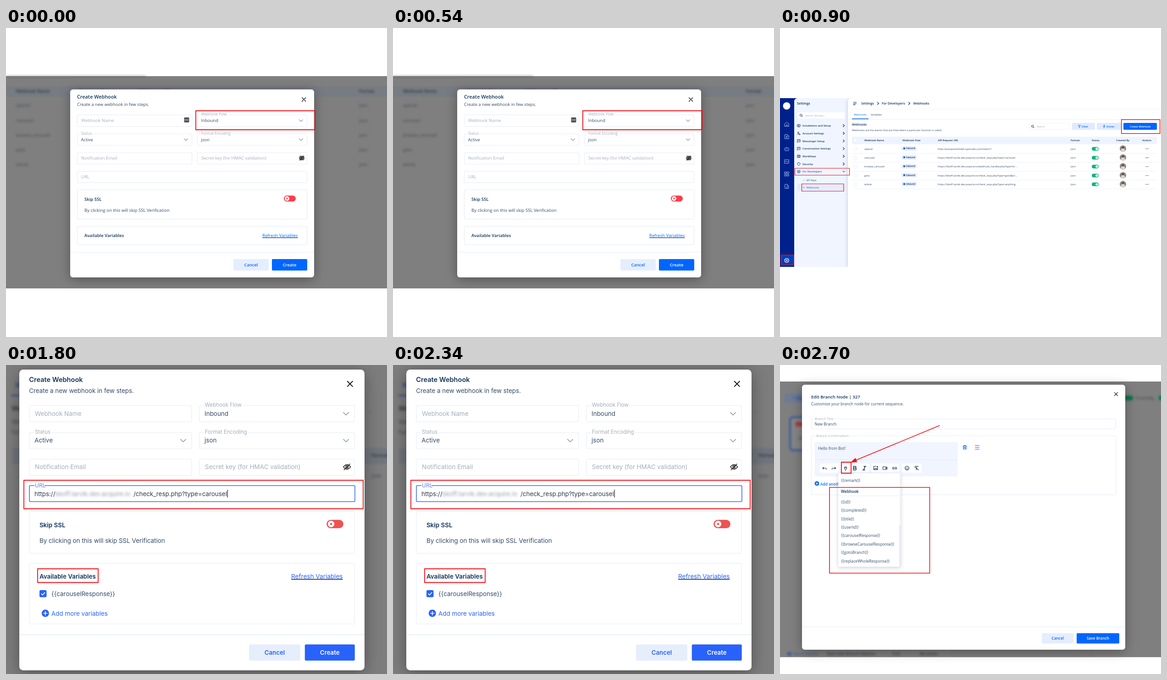
An HTML page that plays this animation: 831x674 px, repeating every 3.6 s.

```html
<!DOCTYPE html>
<html lang="en">
<head>
<meta charset="utf-8">
<style>
html, body { margin: 0; width: 100%; height: 100%; overflow: hidden; background: #fff; }
svg { display: block; }
rect { vector-effect: non-scaling-stroke; }
.sans { font-family: "Open Sans", "Noto Sans", sans-serif; }
.inter { font-family: Inter, sans-serif; }
.bold { font-weight: 600; }
.mid { text-anchor: middle; }
.notch { stroke: #fff; stroke-width: 4px; paint-order: stroke; }
.blur { filter: blur(2.5px); }
.modal { filter: drop-shadow(0 4px 12px rgba(0, 0, 0, .35)); }
.menu { filter: drop-shadow(0 2px 4px rgba(20, 40, 90, .22)); }
</style>
</head>
<body>
<svg id="stage" width="831" height="674" viewBox="0 0 831 674"></svg>
<script>
const NAVY = '#12345a', INK = '#334b68', HINT = '#a3aebd', EDGE = '#e3ebfa', RED = '#f80c12', BLUE = '#0066ff';

const rect = (x, y, w, h, fill, r = 0, stroke = 'none', sw = 1, cls = '') =>
  `<rect x="${x}" y="${y}" width="${w}" height="${h}" rx="${r}" fill="${fill}" stroke="${stroke}" stroke-width="${sw}" class="${cls}"/>`;
const circle = (x, y, r, fill, stroke = 'none', sw = 1) =>
  `<circle cx="${x}" cy="${y}" r="${r}" fill="${fill}" stroke="${stroke}" stroke-width="${sw}"/>`;
// y is the middle of the capitals
const text = (x, y, s, size, fill = INK, cls = '') =>
  `<text x="${x}" y="${y + size * .36}" font-size="${size}" fill="${fill}" class="${cls}">${s}</text>`;
const path = (d, stroke = INK, sw = 1, fill = 'none') =>
  `<path d="${d}" stroke="${stroke}" stroke-width="${sw}" fill="${fill}" stroke-linecap="round" stroke-linejoin="round"/>`;
const icon = (x, y, d, stroke, sw = 1, scale = 1) =>
  `<g transform="translate(${x} ${y}) scale(${scale})">${path(d, stroke, sw)}</g>`;
const frame = (x, y, w, h, sw = 1.5) => rect(x, y, w, h, 'none', 0, RED, sw);
const group = (cls, ...parts) => `<g class="${cls}">${parts.join('')}</g>`;
const button = (x, y, w, h, label, size, fill, color) =>
  rect(x, y, w, h, fill, 2) + text(x + w / 2, y + h / 2, label, size, color, 'bold mid');

const CROSS = 'M-4 -4L4 4M4 -4L-4 4', DOWN = 'M-4 -2L0 2L4 -2', RIGHT = 'M-1.5 -2.5L1.5 0L-1.5 2.5';
const EYE = 'M-5.5 0Q0 -7 5.5 0Q0 7 -5.5 0M-4.5 4.5L4.5 -4.5M-1.8 0A1.8 1.8 0 1 0 1.8 0A1.8 1.8 0 1 0 -1.8 0';
const LENS = 'M-3 -.5A2.3 2.3 0 1 0 1.6 -.5A2.3 2.3 0 1 0 -3 -.5M1.2 1.2L3 3';

// Webhook dialog; "extra" is the added height of the variables box
function webhookForm({ blue, red, soft, extra, toggleX, cancelX, titleSize, url }) {
  const field = (x, y, w, h = 25) => rect(x + .5, y + .5, w, h, '#fff', 1, EDGE);
  const hint = (x, y, s) => text(x, y, s, 9.55, HINT);
  const select = (x, y, w, label, value) =>
    field(x, y, w) + text(x + 9, y - .5, label, 8.1, HINT, 'notch') +
    text(x + 8.5, y + 12.6, value, 9.5) + icon(x + w - 12.5, y + 13, DOWN, '#8d9aab', 1.1);
  const t = (x, y, s, cls = '') => text(x, y, s, 9.5, cls ? NAVY : INK, cls);
  return rect(140, 134, 532, 410 + extra, '#fff', 6, 'none', 0, 'modal') +
    text(155, 149.6, 'Create Webhook', titleSize, NAVY, 'bold') +
    text(155, 166.3, 'Create a new webhook in few steps.', 9.45) +
    icon(649.6, 156, CROSS, '#111', 1.3) +
    field(155, 189, 250) + hint(164, 201.7, 'Webhook Name') +
    select(417, 189, 239, 'Webhook Flow', 'Inbound') +
    select(155, 230.5, 250, 'Status', 'Active') +
    select(417, 230.5, 239, 'Format Encoding', 'json') +
    field(155, 271.5, 250) + hint(164, 284, 'Notification Email') +
    field(417, 271.5, 239) + hint(426, 284, 'Secret key (for HMAC validation)') +
    icon(645, 284, EYE, '#222', 1.1) +
    (url ? '' : field(155, 312, 501) + hint(164, 324.5, 'URL')) +
    field(155, 352.5, 501, 64) + t(171, 373.4, 'Skip SSL', 'bold') +
    t(171, 397.3, 'By clicking on this will skip SSL Verification') +
    rect(toggleX, 365.6, 26, 12.8, red, 6.4) + circle(toggleX + 7, 372, 5, '#fff') + circle(toggleX + 7, 372, 1.7, red) +
    field(155, 432, 501, 40 + extra) + t(171, 452.6, 'Available Variables', 'bold') +
    `<g text-decoration="underline">${text(559, 452.6, 'Refresh Variables', 9.6, blue)}</g>` +
    rect(140, 488.5 + extra, 532, 1, EDGE) +
    button(cancelX, 504 + extra, 573 - cancelX, 25, 'Cancel', 9.4, soft, blue) +
    button(580, 504 + extra, 77, 25, 'Create', 9.4, blue, '#fff');
}

function inboundScene() {
  const names = ['special', 'carousel', 'browse_carousel', 'goto', 'whole'];
  const dark = '#3f444d';
  return group('sans',
    rect(0, 105, 831, 463, '#7f7f7f'),
    rect(0, 127, 831, 23, '#777b82'),
    group('blur',
      rect(0, 105, 305, 2, '#626468'),
      ...[[22, 'Webhook Name'], [160, 'Webhook Flow'], [287, 'API Request URL'], [770, 'Format']]
        .map(([x, s]) => text(x, 138, s, 9.5, '#283142', 'bold')),
      ...names.map((s, i) => text(22, 169 + i * 32.2, s, 9.5, dark) + text(770, 169 + i * 32.2, 'json', 9.5, dark))),
    webhookForm({ blue: BLUE, red: '#ff3b49', soft: '#e5eeff', extra: 0, toggleX: 606, cancelX: 496, titleSize: 10.85 }),
    rect(388.5, 195, 11, 11, '#555', 1.5), ...[391, 394, 397].map(x => circle(x, 200.5, .9, '#fff')),
    rect(640, 278.5, 10.5, 10, 'rgba(40,40,40,.6)', 1.5),
    frame(414, 180.5, 260, 41.5, 1.8));
}

function listScene() {
  const base = 'https://bkoff.tarvik.dev.acquire.io/';
  const rows = [
    ['special', 'http://jsonplaceholder.typicode.com/todos/1'],
    ['carousel', base + 'check_resp.php?type=carousel'],
    ['browse_carousel', base + 'webhook_handle.php?type=br...'],
    ['goto', base + 'check_resp.php?type=goto&amp;br...'],
    ['whole', base + 'check_resp.php?type=anything']];
  const menu = ['Installation and Setup', 'Account Settings', 'Messenger Setup', 'Conversation Settings', 'Workflows', 'Security', 'For Developers'];
  const menuIcons = ['M-3 -2.5H3V2H-3ZM-1 3H1M-.5 -1L1 0L-.5 1Z', 'M-1 -3A1.5 1.5 0 1 0 -1 0A1.5 1.5 0 1 0 -1 -3M-3.5 3Q-1 -1 1 2M1 1.5H3V3H1Z',
    'M-3 -3H3V2H-1L-3 3ZM-1.5 -1H1.5', 'M-3 -3H3V2H-1L-3 3ZM-1.5 -1H1.5', 'M-3 -2.5H3V2.5H-3ZM-1 -2.5V2.5M1 -2.5V2.5',
    'M0 -3L2.7 -2V1Q2 2.5 0 3.3Q-2 2.5 -2.7 1V-2Z', 'M-3 -2.5H3V2H-3ZM-1 3H1M-1.5 -1H1.5M-1.5 .5H1.5'];
  const barIcons = ['M-4.5 -1L0 -4.5L4.5 -1V4.5H-4.5ZM-1.5 4.5V1.5H1.5V4.5', 'M-4 -4.5H2V-2H4.5V4.5H-4ZM-1.5 3Q0 0 2 3M-1 -1H1V.5H-1Z',
    'M-3.5 -2.5H3.5L5 0L3.5 3.5H-3.5L-5 0ZM-1.5 0V1M1.5 0V1M0 -4.5V-2.5', 'M-4.5 -4H4.5V4H-4.5ZM-4 1L-1.5 -1.5L1 1.5L4 -1',
    'M-4.5 -4.5H-1V-1H-4.5ZM1 -4.5H4.5V-1H1ZM-4.5 1H-1V4.5H-4.5ZM1 1H4.5V4.5H1Z', 'M-3.5 -4.5H1.5V-2H4V4.5H-3.5ZM-1 2.5H2M0 0H2'];
  const cell = (x, y, s) => text(x, y, s, 5.65);
  const soft = '#dfeaff';
  const row = ([name, url], i) => {
    const y = 263.5 + i * 19.4;
    return rect(161, y - 3, 6.5, 6.5, '#fff', 1, '#dfe7f5', .7) + cell(184, y, name) +
      rect(265, y - 5.5, 33, 9.5, '#e1ebff', 3.5) + circle(271, y - .8, 2.1, '#0052d6') +
      text(275, y - .8, 'Inbound', 4.85, NAVY, 'bold') + cell(344, y, url) + cell(634, y, 'json') +
      rect(680, y - 4, 15, 8, '#0bb67d', 4) + circle(691, y, 2.7, '#fff') + circle(691, y, .8, '#0bb67d') +
      circle(748, y - .5, 7, '#8e8882') + path(`M743.5 ${y + 4.5}Q744 ${y - 1} 748 ${y - 1}Q752 ${y - 1} 752.5 ${y + 4.5}Q748 ${y + 8} 743.5 ${y + 4.5}`, 'none', 0, '#d9d6d2') +
      circle(748, y - 2.7, 2.2, '#4e4743') +
      [797.8, 800.5, 803.2].map(x => circle(x, y, .8, INK)).join('') + rect(157, y + 9.5, 665, .8, '#e9eef7');
  };
  const item = (s, i) => {
    const y = 213 + i * 16.7, last = i === 6, color = last ? BLUE : NAVY;
    return icon(41, y, menuIcons[i], color, .9) + text(49, y, s, 5.85, color, 'bold') +
      icon(139, y, last ? 'M-2 -1L0 1L2 -1' : RIGHT, color, 1.2);
  };
  return group('sans',
    rect(0, 153, 60, 368, '#00218c'),
    path('M31 521V161Q31 153 39 153H160V521Z', 'none', 0, '#f0f5ff'),
    group('menu', path('M148 521V161Q148 153 156 153H831V521Z', 'none', 0, '#fff')),
    rect(0, 521, 831, 30, '#fff'), rect(0, 130, 831, 23, '#fff'),
    circle(14.5, 170, 8, '#fff'),
    ...barIcons.map((d, i) => icon(14.7, 210 + i * 27.1, d, '#9fb2ee', 1)),
    rect(3, 496, 27, 21, '#0a3bb0', 3),
    icon(14.7, 507, 'M-1.2 -4.5H1.2L1.8 -3L3.6 -3.2L4.7 -1.2L3.7 0L4.7 1.2L3.6 3.2L1.8 3L1.2 4.5H-1.2L-1.8 3L-3.6 3.2L-4.7 1.2L-3.7 0L-4.7 -1.2L-3.6 -3.2L-1.8 -3ZM-1.5 0A1.5 1.5 0 1 0 1.5 0A1.5 1.5 0 1 0 -1.5 0', '#fff', 1.1),
    frame(2.5, 495.5, 27.5, 21.5),
    text(37, 164.2, 'Settings', 7.4, NAVY, 'bold'),
    rect(38, 184, 103, 13.5, '#fff', 2), icon(46.5, 190.6, LENS, NAVY, 1), text(55, 190.6, 'Search Settings...', 5.65, HINT),
    ...menu.map(item),
    rect(38, 340, 101, 15.5, '#e4edff'),
    circle(52, 332, .7, INK), cell(57.5, 332, 'API Keys'),
    circle(52, 348, .9, BLUE), text(57.5, 347.8, 'Webhooks', 5.65, BLUE),
    frame(32.5, 306, 119, 15, 1.2), frame(47.5, 340, 91.5, 16, 1.2),
    path('M160 162H166.5M160 164.7H166.5M160 167.4H164', NAVY, 1.1),
    text(177, 164.3, 'Settings', 7.2, NAVY, 'bold'), icon(214, 164.5, RIGHT, NAVY, 1.2),
    text(222, 164.3, 'For Developers', 7, NAVY, 'bold'), icon(282, 164.5, RIGHT, NAVY, 1.2),
    text(290.5, 164.3, 'Webhooks', 7, NAVY, 'bold'),
    rect(148, 176.5, 683, .8, '#edf1f8'), rect(148, 198.8, 683, .8, '#e6ecf6'),
    text(161, 188.7, 'Webhooks', 5.65, BLUE), cell(198, 188.7, 'Variables'), rect(157, 197.4, 36, 1.6, BLUE),
    text(157, 210.8, 'Webhooks', 6.4, NAVY, 'bold'),
    cell(157, 223.2, 'Webhooks are the events that are fired when a particular function is called.'),
    rect(542.5, 207.5, 89, 14, '#fff', 1, '#eaf0fb', .8), icon(551.5, 214.7, LENS, NAVY, 1), text(560, 214.8, 'Search', 5.65, HINT),
    rect(637, 207, 50, 15, soft, 1.5), icon(653, 214.5, 'M-2.5 -2.5H2.5L.7 0V2.8L-.7 2V0Z', BLUE, .8), text(658, 214.6, 'Filter', 5.7, BLUE, 'bold'),
    rect(691, 207, 53, 15, soft, 1.5), icon(707, 214.5, 'M.5 -3L-2 .5H0L-.5 3L2 -.5H0Z', BLUE, .8), text(712, 214.6, 'Action', 5.7, BLUE, 'bold'),
    button(749, 207, 73, 15, 'Create Webhook', 5.7, BLUE, '#fff'),
    frame(744.7, 199.8, 84, 30.4),
    rect(157, 237, 665, 16.5, '#eef4ff'), rect(161, 242, 6.5, 6.5, '#fff', 1, '#dfe7f5', .7),
    ...[[184, 'Webhook Name'], [267, 'Webhook Flow'], [344.5, 'API Request URL'], [634, 'Format'], [680, 'Status'], [733, 'Created By'], [790, 'Actions']]
      .map(([x, s]) => text(x, 245.2, s, 5.6, NAVY, 'bold')),
    ...rows.map(row));
}

function urlScene() {
  const blue = '#2962fb', size = 13.4;
  return group('inter',
    rect(0, 0, 831, 674, '#7d7d7d'),
    group('blur',
      text(20, 44, 'Webhooks', 14, '#2c478c', 'bold'), rect(12, 65, 40, 3, '#2f4f9e'),
      text(12, 95, 'Webhooks', 14, '#303642', 'bold'), text(12, 124, 'Webhooks are', 13, '#454b55'), text(12, 146, 'function', 13, '#454b55'),
      rect(14, 181, 830, 35, '#70747c'), text(797, 197, 'Format', 11, '#333a47', 'bold'),
      text(797, 242, 'json', 11, '#454b55'), rect(780, 103, 18, 2, '#70747c')),
    `<g transform="translate(29 10) scale(1.4154) translate(-140 -134)">`,
    webhookForm({ blue, red: '#ee5253', soft: '#e6eefb', extra: 53.5, toggleX: 613.5, cancelX: 494, titleSize: 10.3, url: true }),
    '</g>',
    rect(51, 263, 710, 35, '#fff', 2, '#3a6df0', 1.6),
    text(63, 263, 'URL', 12, '#5b83ea', 'notch'),
    text(62, 281.3, 'https://', size, '#2c3a4e'),
    group('blur', text(107, 281.3, 'bkoff.tarvik.dev.acquire.io', size, '#8f98a8')),
    text(278, 281.3, '/check_resp.php?type=carousel', size, '#2c3a4e'),
    rect(482.5, 272, 1.2, 17, '#111'),
    frame(39, 251.5, 740, 62, 1.8), frame(69, 444.5, 132, 30, 1.8),
    rect(73, 491, 15.5, 15.5, blue, 3), path('M77 499L79.8 501.6L84.6 496.2', '#fff', 1.7),
    text(99, 498.8, '{{carouselResponse}}', size),
    circle(85.8, 541.5, 8, blue), path('M81.8 541.5H89.8M85.8 537.5V545.5', '#fff', 1.7),
    text(99, 542, 'Add more variables', size, blue));
}

function branchScene() {
  const vars = ['id', 'completed', 'title', 'userId', 'carouselResponse', 'browseCarouselResponse', 'gotoBranch', 'replaceWholeResponse'];
  const item = (y, s) => text(6.3, y - 236, `{{${s}}}`, 8.55);
  const tools = [
    [97, 'M-4 0H2Q4.5 0 4 3M-4 0L-1.8 -2M-4 0L-1.8 2'], [117.5, 'M4 0H-2Q-4.5 0 -4 3M4 0L1.8 -2M4 0L1.8 2'],
    [143, 'M-3 -1H3M-2.3 -1V1Q-2 3 0 3Q2 3 2.3 1V-1M-1.3 -4V-1M1.3 -4V-1M0 3V5'],
    [163, 'M-2.5 -4H.7A1.9 1.9 0 0 1 .7 0H-2.5ZM-2.5 0H1.2A2 2 0 0 1 1.2 4H-2.5Z'], [184, 'M-1 -4H3.5M-3.5 4H1M1.5 -4L-1.5 4'],
    [209, 'M1 -4H-4.5V3.5H4V0M-4 3L-1.5 0L.5 2L2 .5L4 2.5M3.5 -4.5V-1.5M2 -3H5'], [229, 'M-4.5 -3H2V3H-4.5ZM2 -.5L4.5 -2.5V2.5L2 .5'],
    [250, 'M-1 -2H-2.5A2 2 0 0 0 -2.5 2H-1M1 -2H2.5A2 2 0 0 1 2.5 2H1M-2 0H2'],
    [277, 'M-4.3 0A4.3 4.3 0 1 0 4.3 0A4.3 4.3 0 1 0 -4.3 0M-1.5 -1.5V-1M1.5 -1.5V-1M-2 1Q0 3.2 2 1'], [298, 'M-3.5 -4H4M.5 -4L-1 4M-4 -3L4 4']];
  const box = (y, h, label) => rect(68.5, y + .5, 664, h, '#fff', 2, EDGE) + text(label[0] === 'B' && h > 50 ? 79 : 76, y + .5, label, 7.3, HINT, 'notch');
  return group('sans',
    rect(0, 36, 831, 601.5, '#7f7f7f'),
    group('blur',
      rect(10, 62, 50, 20, '#6e7b94'), text(28, 72, '&lt; Back', 10, '#234b9c', 'bold'),
      rect(22, 114, 80, 72, '#858585', 6, '#244f9f', 3), rect(34, 124, 20, 10, '#a33c42'), text(40, 160, 'Start', 9, '#444'),
      rect(740, 67, 30, 10, '#087346', 4), text(776, 72, 'Incoming', 9, '#333a45'), rect(826, 67, 10, 10, '#087346', 4),
      rect(16, 626, 9, 8, '#3c5d9e', 2), text(30, 630, 'Recurring bot', 8.5, '#34507f'),
      text(102, 630, 'Start with Branch Options', 8.5, '#303744', 'bold'), text(245, 630, 'Path', 8.5, '#303744'),
      text(305, 630, 'No action', 8.5, '#303744', 'bold'), rect(376, 624, 305, 14, 'none', 2, '#707070')),
    rect(0, 637.5, 831, 10, '#fff'),
    rect(48, 43, 705, 578, '#fff', 6, 'none', 0, 'modal'),
    text(68, 69.2, 'Edit Branch Node | 327', 9.55, NAVY, 'bold'),
    text(68, 85.3, 'Customize your branch node for current sequence.', 8.5),
    icon(733, 63.5, CROSS, '#111', 1.4, .9),
    box(117, 22, 'Branch Title'), text(75.5, 129, 'New Branch', 8.5),
    box(154, 128.5, 'Branch Conversation'),
    rect(75.5, 168, 312, 75, '#f0f5ff', 4), text(83, 182, 'Hello from Bot!', 8.5), rect(76, 206, 311, 1, '#e2eaf8'),
    ...[[87, 41], [133, 62], [199, 61], [266, 43]].map(([x, w]) => rect(x, 215, w, 20, '#fff', 2)),
    ...tools.map(([x, d], i) => icon(x, 225, d, NAVY, i === 3 || i === 4 ? 1.6 : 1.1)),
    icon(403, 179.5, 'M-4 -3H4M-3 -3V4H3V-3M-1.2 -4.3H1.2M-1 -1V2M1 -1V2', BLUE, 1.2),
    path('M425.8 175.5H434.5M425.8 179.5H434.5M425.8 183.5H434.5', BLUE, 1.2),
    circle(80.5, 258.5, 5, BLUE), path('M78 258.5H83M80.5 256V261', '#fff', 1.2),
    text(88, 259.5, 'Add another', 8.4, BLUE, 'bold'),
    rect(127, 236, 136, 204, '#fff', 0, 'none', 0, 'menu'),
    `<svg x="127" y="236" width="136" height="204">`,
    item(233, 'info'), item(251.6, 'remark'),
    text(6, 39.5, 'Webhook', 8.5, NAVY, 'bold'), rect(0, 49, 133, 1, EDGE),
    ...vars.map((s, i) => item(298.6 + i * 18.43, s)),
    rect(133, 0, 3, 204, '#f7f9fc'), rect(133, 113, 3, 91, '#e6ebf3'), '</svg>',
    frame(134, 212, 21, 24, 1.8), frame(108, 267, 218.5, 187, 1.6),
    path('M348 132L164 208.3', RED, 1.5), path('M154.5 212.3L164.5 203L168 211.5Z', RED, .5, RED),
    rect(48, 570.5, 705, 1, EDGE),
    button(571, 585, 69.5, 22.5, 'Cancel', 8.4, '#e5eeff', BLUE),
    button(647, 585, 93, 22.5, 'Save Branch', 8.3, BLUE, '#fff'));
}

const stage = document.getElementById('stage');
stage.innerHTML = [inboundScene, listScene, urlScene, branchScene].map(scene => scene()).join('');
const scenes = [...stage.children];

function draw(now) {
  const current = Math.floor(now % 3600 / 900);
  scenes.forEach((scene, i) => scene.style.display = i === current ? '' : 'none');
  requestAnimationFrame(draw);
}
draw(performance.now());
</script>
</body>
</html>
```
